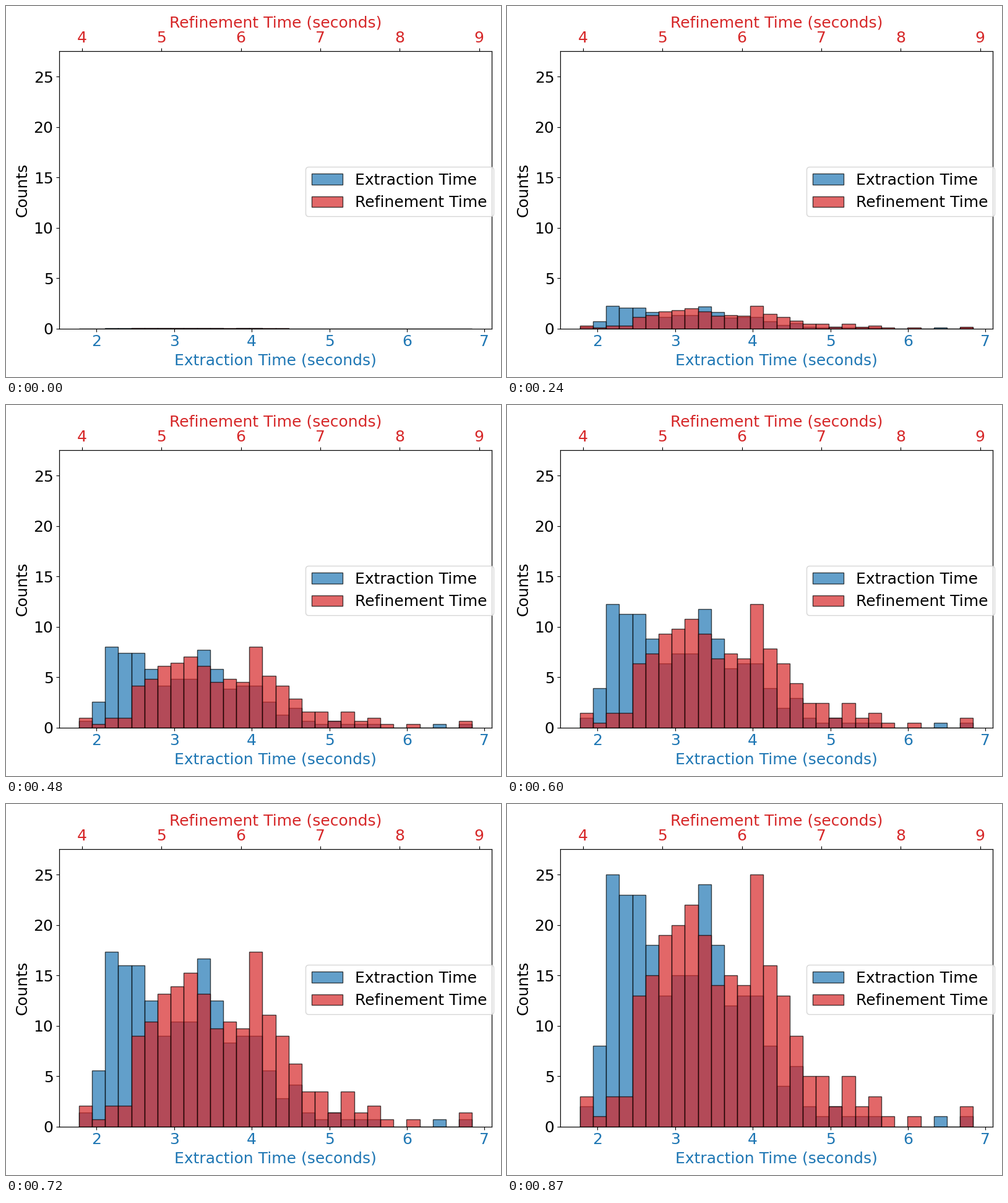
A matplotlib script that plays this animation: 800x600 px, repeating every 900 ms.

```python
import numpy as np
import matplotlib.pyplot as plt
from matplotlib.animation import FuncAnimation

FRAMES = 30
SIZE = 18

extraction = np.array([2, 8, 25, 23, 23, 18, 13, 15, 15, 24, 18, 12, 13, 13, 8,
                       4, 6, 2, 1, 2, 1, 1, 1, 0, 0, 0, 0, 1, 0, 1])
refinement = np.array([3, 1, 3, 3, 13, 15, 19, 20, 22, 19, 14, 15, 14, 25, 16,
                       13, 9, 5, 5, 2, 5, 2, 3, 1, 0, 1, 0, 0, 0, 2])


def draw_histogram(ax, counts, low, high, color, name):
    edges = np.linspace(low, high, len(counts) + 1)
    bars = ax.bar(edges[:-1], counts, width=np.diff(edges), align="edge",
                  color=color, edgecolor="black", alpha=0.7, label=name)
    ax.set_xlabel(f"{name} (seconds)", color=color, fontsize=SIZE)
    ax.tick_params(axis="x", labelcolor=color, labelsize=SIZE)
    return bars


plt.rcParams["font.family"] = "DejaVu Sans"
fig, ax = plt.subplots(figsize=(8, 6), dpi=100)
top_ax = ax.twiny()

histograms = [
    (draw_histogram(ax, extraction, 1.773, 6.840, "tab:blue", "Extraction Time"),
     extraction),
    (draw_histogram(top_ax, refinement, 3.960, 8.912, "tab:red", "Refinement Time"),
     refinement),
]

ax.set_ylabel("Counts", fontsize=SIZE)
ax.tick_params(axis="y", labelsize=SIZE)
ax.set_ylim(0, 1.1 * max(extraction.max(), refinement.max()))
fig.tight_layout()
fig.legend(loc="center right", fontsize=SIZE)


def update(frame):
    # Bars grow with a quadratic ease-in.
    growth = ((frame + 1) / FRAMES) ** 2
    for bars, counts in histograms:
        for bar, count in zip(bars, counts):
            bar.set_height(count * growth)
    return [bar for bars, _ in histograms for bar in bars]


anim = FuncAnimation(fig, update, frames=FRAMES, interval=30, repeat=True,
                     repeat_delay=0, blit=False)
plt.show()
```
